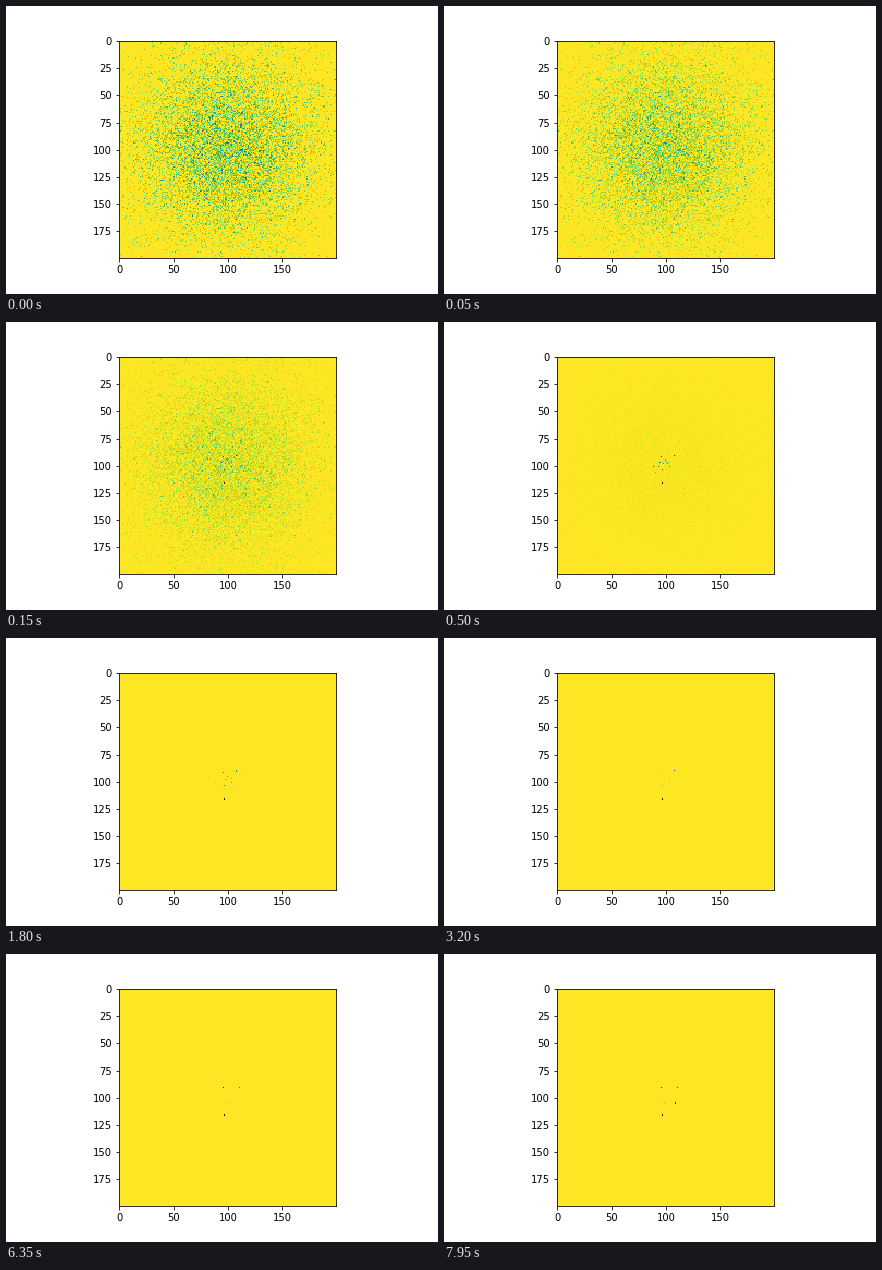
Recreate the animation shown at these times as a matplotlib script. Size 432 px wide and 288 px high, loop 8000 ms.

```python
import numpy as np
import matplotlib.pyplot as plt
from matplotlib.animation import FuncAnimation

SIZE = 200
FRAMES, INTERVAL = 160, 50

plt.rcParams["font.family"] = "DejaVu Sans"
plt.rcParams["font.size"] = 10

# column, row, peak darkness, tick of disappearance
FADING = [
    (95, 92, .95, 70), (107, 91, .95, 58), (88, 101, .95, 42),
    (96, 104, .8, 88), (94, 97, .6, 34), (99, 95, .6, 70),
    (100, 97, .5, 34), (97, 98, .6, 64), (101, 98, .5, 34),
    (93, 101, .6, 34), (103, 101, .55, 79), (103, 97, .3, 138),
    (90, 106, .35, 50),
]

# column, row, peak darkness, first tick, tick of full strength
GROWING = [
    (96, 116, 1, -2, 3), (95, 91, .9, 71, 79), (107, 90, .85, 10, 50),
    (98, 105, .1, 105, 111), (110, 91, .85, 111, 134),
    (108, 105, .85, 134, 153),
]
VANISHING = {(107, 90): 111}

rng = np.random.default_rng(7)
edges = np.arange(SIZE + 1)
scatter = rng.normal(99, 45, (2, 10000))
counts = np.histogram2d(*scatter, bins=(edges, edges))[0]


def ramp(tick, start, end):
    return float(np.clip((tick - start) / (end - start), 0, 1))


def field(frame):
    # Late changes come in sparser steps.
    tick = frame if frame < 58 else frame - frame % 3
    dark = np.clip(counts / (5 * 1.3 ** frame), 0, 1)

    def mark(col, row, level):
        dark[row, col] = max(dark[row, col], level)

    for col, row, peak, end in FADING:
        rise = .35 + .65 * ramp(tick, 0, 3)
        mark(col, row, peak * rise * (1 - ramp(tick, 8, end)))
    for col, row, peak, start, end in GROWING:
        level = peak * ramp(tick, start, end)
        if (col, row) in VANISHING:
            gone = VANISHING[col, row]
            level *= 1 - ramp(tick, gone - 20, gone)
        mark(col, row, level)
    return 1 - dark


fig = plt.figure(figsize=(6, 4), dpi=72, facecolor="white")
ax = fig.add_axes([0.125, 0.125, 0.775, 0.755])
image = ax.imshow(field(0), cmap="viridis", vmin=0, vmax=1,
                  interpolation="nearest")
ax.set_xticks(range(0, SIZE, 50))
ax.set_yticks(range(0, SIZE, 25))


def update(frame):
    image.set_data(field(frame))
    return [image]


anim = FuncAnimation(fig, update, frames=FRAMES, interval=INTERVAL,
                     repeat=True, repeat_delay=0)
plt.show()
```
